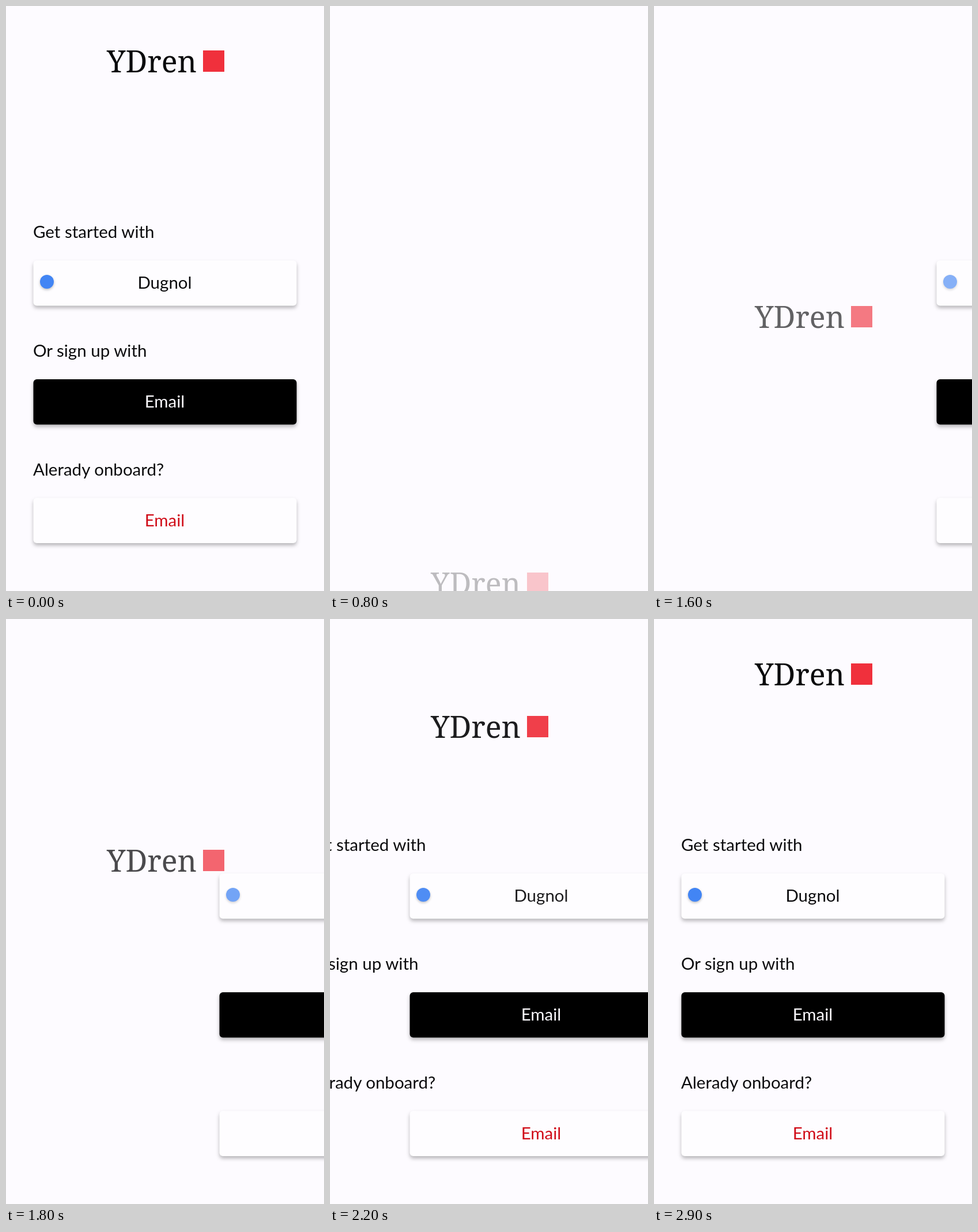
Animation, 552 px wide and 1014 px high, one loop 3000 ms. Source, as an HTML page:

```html
<!DOCTYPE html>
<html lang="en">
<head>
<meta charset="utf-8">
<title>Sign-in screen</title>
<style>
  html, body { margin: 0; width: 100%; height: 100%; overflow: hidden; background: #fdfbff; }
  svg { display: block; width: 100%; height: 100%; font: 29.5px Lato, sans-serif; fill: #0b0b0d; }
  .brand { font: 52px "Noto Serif", serif; }
  .card { fill: #fefdff; filter: drop-shadow(0 4px 3px rgba(0, 0, 0, .27)); }
  .dark { fill: #000; }
  .badge { fill: #4285f4; filter: drop-shadow(0 2px 2px rgba(0, 0, 0, .25)); }
  .buttons text { text-anchor: middle; }
</style>
</head>
<body>
<svg id="screen" viewBox="0 0 552 1014">
  <g id="logo">
    <text class="brand" x="175" y="114.5">YDren</text>
    <rect x="342" y="77" width="37" height="37" fill="#f0303c"/>
  </g>
  <g id="labels">
    <text x="47" y="402">Get started with</text>
    <text x="47" y="608">Or sign up with</text>
    <text x="47" y="813.5">Alerady onboard?</text>
  </g>
  <g id="buttons" class="buttons">
    <rect class="card" x="47.5" y="441" width="457" height="78.5" rx="6"/>
    <rect class="card dark" x="47.5" y="647" width="457" height="78.5" rx="6"/>
    <rect class="card" x="47.5" y="852.5" width="457" height="78.5" rx="6"/>
    <g id="provider">
      <circle class="badge" cx="71" cy="478" r="12"/>
      <text x="275.5" y="490">Dugnol</text>
    </g>
    <text x="275.5" y="696" fill="#fdfbff">Email</text>
    <text x="275.5" y="901.5" fill="#d00c18">Email</text>
  </g>
</svg>
<script>
  const LOOP = 3000, STEP = 100, FADE_END = 400, FADE_DISTANCE = 1220;
  const [screenEl, logo, labels, buttons, provider] =
    ["screen", "logo", "labels", "buttons", "provider"].map(id => document.getElementById(id));

  // [time in ms, distance still to travel]; all groups share this distance
  const slide = [[400, 1137], [800, 905], [1200, 675], [1600, 443], [2000, 203], [2200, 91], [2360, 0], [3000, 0]];

  function distanceAt(t) {
    if (t < FADE_END) return 0;
    const next = slide.findIndex(([time]) => time > t);
    const [t0, d0] = slide[next - 1], [t1, d1] = slide[next];
    return d0 + (d1 - d0) * (t - t0) / (t1 - t0);
  }

  const move = (el, x, y) => el.setAttribute("transform", `translate(${x} ${y})`);

  function render(t) {
    const distance = distanceAt(t);
    const opacity = Math.max(0, 1 - distance / FADE_DISTANCE);
    screenEl.style.opacity = t < FADE_END ? 1 - t / FADE_END : 1;
    move(logo, 0, distance);
    move(labels, -distance, 0);
    move(buttons, distance, 0);
    logo.style.opacity = provider.style.opacity = opacity;
  }

  const start = performance.now();
  function tick() {
    const elapsed = (performance.now() - start) % LOOP;
    render(Math.floor(elapsed / STEP) * STEP);
    requestAnimationFrame(tick);
  }
  tick();
</script>
</body>
</html>
```
